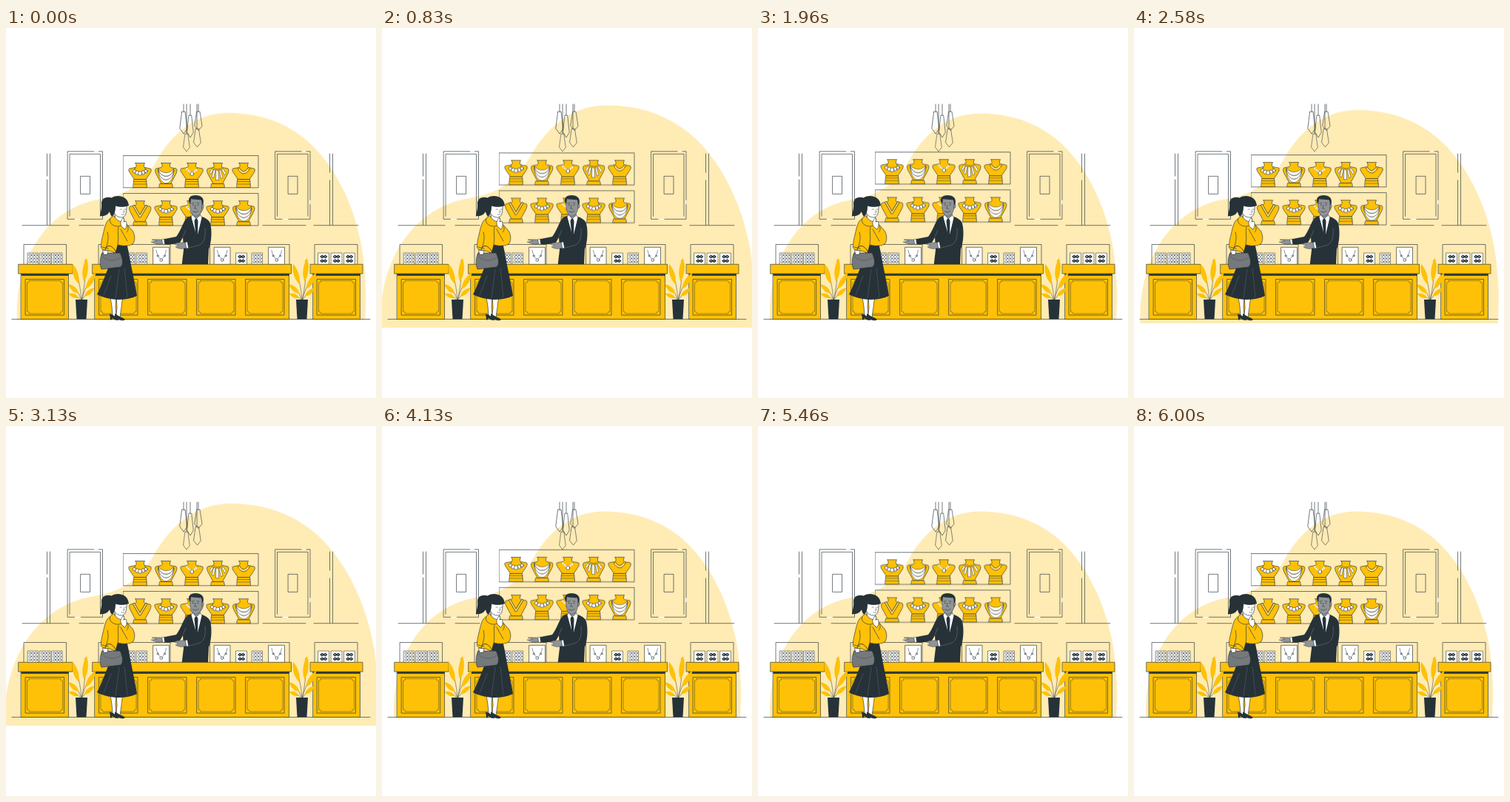
Animation of 500 by 500 pixels, one loop 6040 ms. Source, as an HTML page:

```html
<!DOCTYPE html>
<html lang="en">
<head>
<meta charset="utf-8">
<title>Jewellery shop</title>
<style>
  :root { --dark: #263238; --gold: #ffc107; --cream: #ffebb4; }
  html, body { margin: 0; width: 100%; height: 100%; overflow: hidden; background: #fff; }
  svg { display: block; width: 100vw; height: 100vh; }
  .line { fill: none; stroke: var(--dark); stroke-width: .65; stroke-linejoin: round; stroke-linecap: round; }
  .gold { fill: var(--gold); }
  .white { fill: #fff; }
  .dark { fill: var(--dark); stroke: none; }
  .skin { fill: #919497; }
  .gap { stroke: #fff; stroke-width: 1.4; }
  .pale { fill: none; stroke: #6b757a; stroke-width: .4; }
  .blob { fill: var(--cream); transform-origin: 250.5px 254.5px; animation: beat 6.04s -.03s linear infinite; }
  .shelves { animation: float 3.02s -.02s ease-in-out infinite; }
  @keyframes beat {
    0%, 30%, 40%, 60%, 100% { transform: scale(1); }
    10%, 50% { transform: scale(1.1); }
  }
  @keyframes float {
    0%, 100% { transform: translateY(0); }
    50% { transform: translateY(-6px); }
  }
</style>
</head>
<body>
<svg viewBox="0 0 500 500">
  <defs>
    <g id="bust" class="gold">
      <path d="M-6 0H6.500C5 2.500 5 5 6.500 6L14.500 7.500C16 9 15 12 13.500 14L8 22H-7.500L-13 14C-14.500 12 -16 9 -14.500 7.500L-6 6C-4.500 5 -4.500 2.500 -6 0Z"/>
      <path d="M-8 22H8.500L9.500 33H-9Z"/>
      <path d="M-8.300 25H8.800M-8.600 28.500H9" stroke-width=".5"/>
    </g>
    <g id="tallBust" class="gold">
      <path d="M-8 28H8.500L9.500 33H-9Z"/>
      <path d="M-6 0H6.500C5 2.500 5 5 6.500 6L14 7.500C15.500 9 15 12 13.500 15L6.500 28H-6L-13 15C-14.500 12 -15 9 -13.500 7.500L-6 6C-4.500 5 -4.500 2.500 -6 0Z"/>
    </g>
    <g id="beads" class="white">
      <path d="M-6 6L-8 10M6.500 6L8 10" fill="none"/>
      <circle cx="-7.500" cy="11" r="2.200"/><circle cx="8" cy="11" r="2.200"/>
      <circle cx="-3.700" cy="13" r="2.600"/><circle cx="4.200" cy="13" r="2.600"/>
      <circle cx=".2" cy="14" r="2.700"/>
    </g>
    <g id="strands" class="white" stroke-width=".5">
      <path d="M-10.500 10C-6 27 6.500 27 11 10C9 33 -8.500 33 -10.500 10Z"/>
      <path d="M-10.500 9C-6 21 6.500 21 11 9C9 27 -8.500 27 -10.500 9Z"/>
      <path d="M-10 7.500C-6 15 6.500 15 10.500 7.500C9 21 -8.500 21 -10 7.500Z"/>
    </g>
    <g id="pearls">
      <path d="M-7 7Q0 17 7.500 7" fill="none"/>
      <path d="M-6.500 8Q0 16.500 7 8" fill="none" stroke="#fff" stroke-width="2.500" stroke-dasharray="0 3"/>
      <circle class="white" cx=".3" cy="14.500" r="2.400"/>
    </g>
    <g id="rays" class="white" stroke-width=".5">
      <path d="M-6 6Q0 11 6.500 6" fill="none"/>
      <path d="M-8 8L-11 13L-9.500 15L-6 9.500ZM-5.500 9L-8 19L-5.500 20L-3 10ZM-2.200 10L-2.500 23H1.500L1 10ZM2 10L4.500 21L7 20L4 9.500ZM5.500 9L9.500 16L11.500 14L7.500 8Z"/>
    </g>
    <g id="chain">
      <path d="M-6 6Q0 17 6.500 6M-8 7Q0 22 9 7" fill="none"/>
      <path d="M-5.500 9Q0 16.500 6 9" fill="none" stroke="#fff" stroke-width="1.300" stroke-dasharray="1 1.500"/>
    </g>
    <g id="vee" fill="none">
      <path d="M-8 7L0 21L8.500 7" stroke-width="3.200"/>
      <path d="M-8 7L0 21L8.500 7" stroke="#ffd75a" stroke-width="2" stroke-dasharray="1.800 .8"/>
    </g>

    <g id="rings" stroke-width=".55">
      <path class="white" d="M0 0H14V15.500H0Z"/>
      <g id="ringRow">
        <circle cx="3" cy="3" r="1.600"/><circle cx="7" cy="3" r="1.600"/><circle cx="11" cy="3" r="1.600"/>
      </g>
      <use href="#ringRow" y="4.500"/><use href="#ringRow" y="9"/>
    </g>
    <g id="earrings" stroke-width=".55">
      <path class="white" d="M0 0H14.500V15.500H0Z"/>
      <g id="pair">
        <path class="dark" d="M2 5L5 2.500L7.300 4L9.500 2.500L12.500 5L9.500 7.500L7.300 6L5 7.500Z"/>
        <circle class="white" cx="5" cy="5" r=".9"/><circle class="white" cx="9.500" cy="5" r=".9"/>
      </g>
      <use href="#pair" y="5.700"/>
    </g>
    <g id="card">
      <path class="white" d="M0 0H21.500V23.500H0Z"/>
      <path d="M4 4Q5 12 10.700 17Q16.500 12 17.500 4" stroke-width=".5"/>
      <circle class="white" cx="10.700" cy="17.300" r="1.800"/>
      <circle class="white" cx="6" cy="11.500" r="1"/><circle class="white" cx="15.500" cy="11.500" r="1"/>
    </g>

    <g id="panel">
      <path d="M0 0H52V48.500H0Z"/>
      <path d="M5 2H47Q47 5 50 5V43.500Q47 43.500 47 46.500H5Q5 43.500 2 43.500V5Q5 5 5 2Z" stroke-width=".45"/>
    </g>
    <g id="door">
      <path d="M0 0H47V91.500H0ZM2.500 87.500V3.500H44V87.500"/>
      <path d="M17.500 33.500H30V57.500H17.500Z"/>
      <path class="gap" d="M10 91.500H17M36 0H41M47 66V71"/>
    </g>
    <path id="leaf" class="gold" d="M0 0C-5 -8 -4.500 -20 0 -30C4.500 -21 5 -8 0 0Z" stroke="none"/>
    <g id="plant">
      <path d="M0 -25C-1 -43 -5 -59 -10 -70M0 -25C5 -47 6 -63 5 -80M0 -25C5 -43 10 -53 16 -60M0 -25C-4 -37 -8 -42 -15 -46M0 -25C6 -34 10 -38 16 -41M0 -25C-5 -31 -9 -32 -15 -33" stroke-width=".5"/>
      <use href="#leaf" transform="translate(3.500 -51) rotate(6) scale(1 1.070)"/>
      <use href="#leaf" transform="translate(-4 -48) rotate(-17) scale(.95 .93)"/>
      <use href="#leaf" transform="translate(6 -41) rotate(31) scale(.95 .85)"/>
      <use href="#leaf" transform="translate(-4 -35) rotate(-48) scale(.85 .6)"/>
      <use href="#leaf" transform="translate(4 -31) rotate(50) scale(.8 .58)"/>
      <use href="#leaf" transform="translate(-4 -29) rotate(-68) scale(.7 .47)"/>
      <path class="dark" d="M-8 -26.500H8L6.500 0H-6.500Z"/>
    </g>
    <path id="lamp" d="M-2 0H2L5 23L0 30L-5 23Z"/>
  </defs>

  <path class="blob" d="M16 394C14 350 27 307 50 278C68 255 95 237 126 232C160 227 185 213 203 181C226 140 258 115.500 300 115.500C358 115.500 405 140 437 188C469 236 490 300 484 394Z"/>

  <!-- wall -->
  <g class="line">
    <path d="M22 266.700H85M99 266.700H132M347 266.700H405M416 266.700H476"/>
    <path d="M55.500 170V200M55.500 205V266M59.500 170V266M437.500 170V195M437.500 206V266M441.500 170V266"/>
    <use href="#door" x="83.500" y="166.800"/>
    <use href="#door" x="364" y="166.800"/>
    <path d="M240 103V113M244 103V143M249 103V118M258 103V136M260 103V113"/>
    <use href="#lamp" x="240" y="113"/>
    <use href="#lamp" transform="translate(249 118) scale(.85 1)"/>
    <use href="#lamp" transform="translate(244 143) scale(.85 .8)"/>
    <use href="#lamp" transform="translate(258.500 136) scale(.95 .83)"/>
    <use href="#lamp" transform="translate(260 113) scale(1 .85)"/>
  </g>

  <g class="line shelves">
    <path d="M158.500 172.500H341V215.800H158.500ZM158.500 223.500H341V267H158.500Z"/>
    <g transform="translate(0 182.500)">
      <use href="#bust" x="181"/><use href="#beads" x="181"/>
      <use href="#tallBust" x="216"/><use href="#strands" x="216"/>
      <use href="#bust" x="251"/><use href="#pearls" x="251"/>
      <use href="#tallBust" x="286"/><use href="#rays" x="286"/>
      <use href="#bust" x="321"/><use href="#chain" x="321"/>
    </g>
    <g transform="translate(0 233.700)">
      <use href="#tallBust" x="181"/><use href="#vee" x="181"/>
      <use href="#bust" x="216"/><use href="#beads" x="216"/>
      <use href="#bust" x="251"/><use href="#pearls" x="251"/>
      <use href="#bust" x="286"/><use href="#beads" x="286"/>
      <use href="#tallBust" x="321"/><use href="#strands" x="321"/>
    </g>
  </g>

  <!-- shopkeeper -->
  <g class="line">
    <path class="skin" d="M251 246H263V260H251Z" stroke="none"/>
    <path class="white" d="M250 255L252.500 252.500L257 258L262.500 253L265 256L260 281H256Z"/>
    <path class="dark" d="M255.500 258H258.500L259.500 261L259 280H256.500L254.500 261Z"/>
    <path class="dark" d="M250 254L245 256C239 262 236 275 230 282L212 285.500L213 292.500C221 293 229 292 235 290L239 283L240 300L237.500 321H273L274 299C278 289 278.500 273 276 264C274 259 270 257 265 255L259 279H257Z"/>
    <path class="skin" d="M212 286C205 286 202 285.500 197 286L204 288L196 289C202 292 206 293 212 291.500Z" stroke-width=".4"/>
    <path class="white" d="M211 285.500L213.500 285L214.500 292L212 292.500Z" stroke-width=".4"/>
    <path d="M269 271C270 283 268 289 262 293L244 298M239 282L243 273" stroke="#88949a" stroke-width=".4"/>
    <path class="skin" d="M243 290C238 289 235 291 232 290L227 292L233 294L229 296C234 299 239 299 244 297Z" stroke-width=".4"/>
    <path class="white" d="M242.500 289.500L245 289L246.500 297L244 298Z" stroke-width=".4"/>
    <path class="skin" d="M249 232C248 243 249 252 256 254.500C263 254 266 246 265.500 232C263 227 251 227 249 232Z" stroke-width=".4"/>
    <path class="skin" d="M265 238C268 237 268 243 265 244Z" stroke-width=".4"/>
    <path class="dark" d="M247.500 236C245.500 230 249 226 256 226C264 226 268.500 230 266.500 238L265 239L264 232.500C259 231.500 254 232 250 231L249 238Z"/>
    <path d="M251 237L254 236.300M258 236.300L261 237M256 239L255 244H257.500M252.500 248Q256 250.500 260 247.500" stroke-width=".6"/>
    <circle class="dark" cx="252.800" cy="239.300" r=".7"/><circle class="dark" cx="259.500" cy="239.300" r=".7"/>
  </g>

  <!-- glass cases -->
  <g class="line">
    <path d="M24 319V292.500H81.500V319M125 319V292.500H222V319M275.500 319V292.500H383V319M417 319V292.500H475V319"/>
    <use href="#rings" x="29.500" y="304"/><use href="#rings" x="46" y="304"/><use href="#rings" x="62" y="304"/>
    <use href="#rings" x="160" y="304"/><use href="#rings" x="176.500" y="304"/>
    <use href="#card" x="199" y="296.300"/><use href="#card" x="281.500" y="296.300"/>
    <use href="#earrings" x="311" y="304"/><use href="#rings" x="332.500" y="304"/>
    <use href="#card" x="355" y="296.300"/>
    <use href="#earrings" x="422" y="304"/><use href="#earrings" x="439.500" y="304"/><use href="#earrings" x="457" y="304"/>
  </g>

  <!-- counters -->
  <g class="line">
    <path d="M8 393.500H492"/>
    <g class="gold">
      <path d="M20.500 332H84.500V393.500H20.500ZM120 332H382.500V393.500H120ZM415 332H478.500V393.500H415Z"/>
      <path d="M17 319.300H90V332H17ZM117 319.300H385.500V332H117ZM411.500 319.300H482V332H411.500Z"/>
    </g>
    <path d="M20.500 333.500H84.500M120 333.500H382.500M415 333.500H478.500" stroke-width="2.400" stroke-linecap="butt"/>
    <use href="#panel" x="26.500" y="339.500"/>
    <use href="#panel" x="126" y="339.500"/><use href="#panel" x="192" y="339.500"/>
    <use href="#panel" x="258" y="339.500"/><use href="#panel" x="324" y="339.500"/>
    <use href="#panel" x="420.500" y="339.500"/>
    <use href="#plant" x="102" y="393.500"/>
    <use href="#plant" x="400" y="393.500"/>
  </g>

  <!-- customer -->
  <g class="line">
    <path class="white" d="M140 358L143 376L144 389L149 391L148 377L149 360ZM149 360L150 377L149 388L154 391L156 377L158 360Z"/>
    <path class="dark" d="M140 386L145 388C148 391 151 392 153 394C151 396 147 395 144 392L142 395L141 394ZM147 386L152 389C155 391 160 392 161 394C159 396 153 396 150 392L148 395L147 394Z"/>
    <path class="dark" d="M149 290H163L166 304C169 322 174 343 177 362C162 369 140 369 123 360C132 342 138 324 145 305Z"/>
    <path class="pale" d="M153 326L148 365M160 325L164 364M142 335L132 361"/>
    <path class="dark" d="M144 230C137 227 129 229 129 237C130 244 127 250 127 254C136 255 141 250 142 241Z"/>
    <path class="white" d="M147 250L148 262L160 266L158 251Z"/>
    <path class="white" d="M144 238C143 248 148 256 156 256C162 256 163 249 163 240C161 232 147 231 144 238Z"/>
    <path class="dark" d="M139 240C138 231 144 227 151 227C160 227 165 232 166 240C160 242.500 153 242 148 240.500C148 247 147 252 143 255C140 251 139 246 139 240Z"/>
    <path d="M154 245H156.500M160 245H162M159 246L160 249H158M156 252Q158 253 160 251.500" stroke-width=".5"/>
    <path class="gold" d="M143 257C137 258 135 264 133 271C131 280 128 289 128.500 297C131 301 136 301 140 301L148 304L151 293C158 295 168 295 172 291C175 285 174 279 171 274L162 264L158 261C154 265 148 261 143 257Z"/>
    <path class="gold" d="M142 256C138 260 141 267 150 268C156 268 160 265 160 262C154 263 149 259 146 254Z"/>
    <path class="white" d="M156 268C154 264 155 260 158 257L160 258L159 262L162 261C164 265 163 269 161 272Z"/>
    <path d="M155 272L164 288M152 269C150 276 153 285 151 293M137 276C139 282 138 290 135 297M164 267C166 271 165 274 163 276M130 296L138 298"/>
    <path d="M133 304C134 293 142 289 150 305" stroke-width=".9"/>
    <path fill="#75797c" d="M130 304H154C157 309 158 315 157 320L155 323L129 326C126 319 127 309 130 304Z"/>
    <path d="M129 306C133 315 148 317 156 309" stroke="#4d555a"/>
    <path class="white" d="M131 300L138 301L137 306L132 306Z"/>
  </g>
</svg>
</body>
</html>
```
